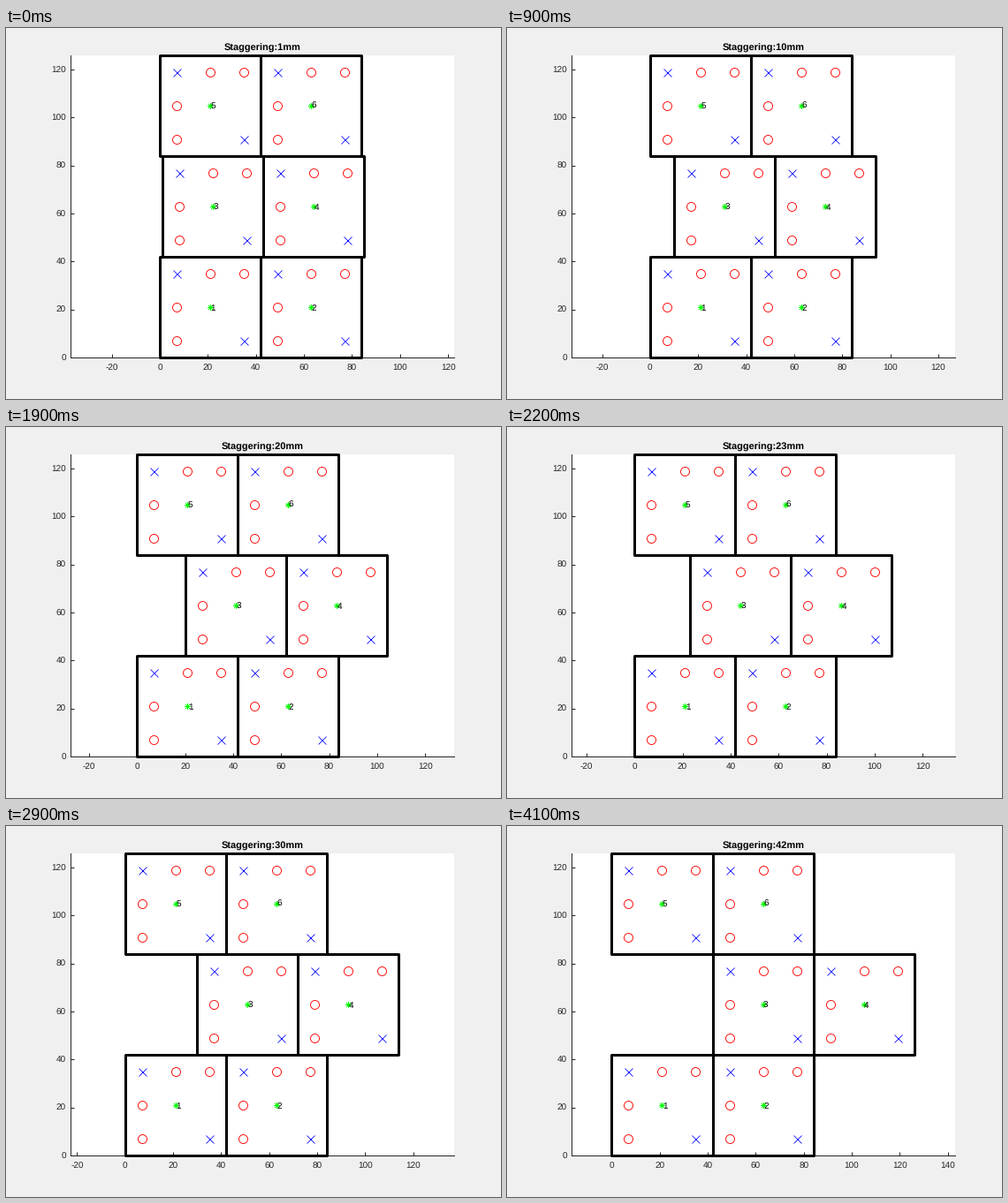
Recreate the animation shown at these times as a matplotlib script. Size 560 by 420 pixels, loop 4.2 s.

```python
import matplotlib.pyplot as plt
from matplotlib.animation import FuncAnimation
from matplotlib.patches import Rectangle

W, H, DPI = 560, 420, 80
PX = 72 / DPI  # points per pixel
LEFT, BOTTOM, WIDTH, HEIGHT = 72.55, 46.97, 434, 342.3  # plot area in pixels
SIDE = 42
STEPS = 42
CIRCLES = [(21, 35), (35, 35), (7, 21), (7, 7)]
CROSSES = [(7, 35), (35, 7)]
INK = "#262626"

plt.rcParams["font.family"] = "Liberation Sans"
plt.rcParams["axes.unicode_minus"] = False
plt.rcParams["text.hinting"] = "no_hinting"

fig = plt.figure(figsize=(W / DPI, H / DPI), dpi=DPI, facecolor="#f0f0f0")
ax = fig.add_axes([LEFT / W, BOTTOM / H, WIDTH / W, HEIGHT / H],
                  facecolor="white")
y_max = 3 * SIDE
x_span = y_max * WIDTH / HEIGHT
ax.set_ylim(0, y_max)

for name, spine in ax.spines.items():
    spine.set_visible(name in ("left", "bottom"))
    spine.set_linewidth(PX)
    spine.set_color(INK)
    spine.set_zorder(1)

ax.set_xticks(range(-40, 161, 20))
ax.set_yticks(range(0, 121, 20))
ax.set_axisbelow(True)
ax.tick_params(direction="in", length=4.3 * PX, width=PX, color=INK,
               labelcolor=INK, labelsize=10 * PX)
ax.tick_params(axis="x", pad=15 * PX)
ax.tick_params(axis="y", pad=4.5 * PX)
for label in ax.get_xticklabels():
    label.set_va("baseline")

title = fig.text(290 / W, 1 - 26 / H, "", ha="center", va="baseline",
                 fontsize=11 * PX, fontweight="bold", color="black")


class Module:
    """One numbered square with its holes, pins and centre mark."""

    def __init__(self, number):
        self.row, self.col = divmod(number - 1, 2)
        self.frame = ax.add_patch(Rectangle(
            (0, self.row * SIDE), SIDE, SIDE, fill=False, edgecolor="black",
            linewidth=3 * PX, joinstyle="round", clip_on=False, zorder=3))
        self.marks = [
            self.add_marks(CIRCLES, "o", 10, "red", 0.9),
            self.add_marks(CROSSES, "x", 9, "blue", 0.8),
            self.add_marks([(21, 21)], (8, 2, 0), 7, "lime", 0.7),
        ]
        self.label = ax.text(0, self.row * SIDE + 21, str(number), ha="left",
                             va="center_baseline", fontsize=10 * PX,
                             color="black", zorder=5)

    def add_marks(self, points, marker, size, color, width):
        xs = [x for x, _ in points]
        ys = [y + self.row * SIDE for _, y in points]
        line, = ax.plot(xs, ys, linestyle="none", marker=marker,
                        markersize=size * PX, markerfacecolor="none",
                        markeredgecolor=color, markeredgewidth=width * PX,
                        zorder=4)
        return line, xs

    def place(self, shift):
        left = self.col * SIDE + (shift if self.row == 1 else 0)
        self.frame.set_x(left)
        for line, xs in self.marks:
            line.set_xdata([left + x for x in xs])
        self.label.set_x(left + 21.2)


modules = [Module(n) for n in range(1, 7)]


def update(i):
    shift = i + 1
    middle = (2 * SIDE + shift) / 2
    ax.set_xlim(middle - x_span / 2, middle + x_span / 2)
    for module in modules:
        module.place(shift)
    title.set_text(f"Staggering:{shift}mm")
    return []


anim = FuncAnimation(fig, update, frames=STEPS, interval=100,
                     init_func=lambda: update(0), repeat=True, repeat_delay=0)
plt.show()
```
